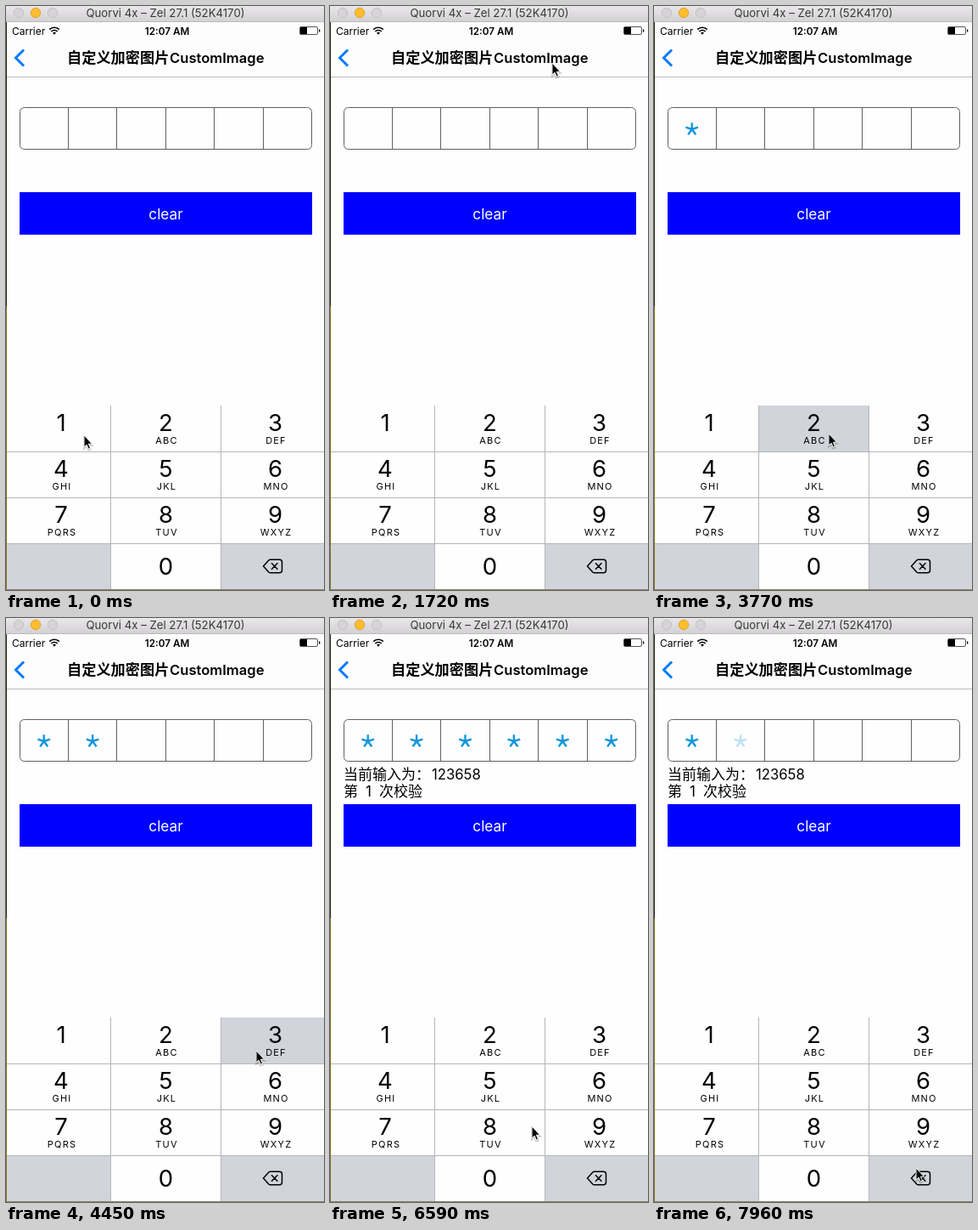
Animation, 375 px wide and 687 px high, one loop 8000 ms. Source, as an HTML page:

```html
<!DOCTYPE html>
<html lang="zh-CN">
<head>
<meta charset="utf-8">
<title>Passcode entry</title>
<style>
html, body { margin: 0; width: 100%; height: 100%; overflow: hidden; background: #fefefe; }
svg { display: block; width: 375px; height: 687px; font-family: Inter, "Noto Sans CJK SC", "Noto Sans CJK", sans-serif; }
.mid { text-anchor: middle; }
.bold { font-weight: 600; }
.digit { font-size: 27.5px; }
.sub { font-size: 11px; letter-spacing: 1.2px; }
.label { font-size: 17px; }
</style>
</head>
<body>
<svg viewBox="0 0 375 687">
  <defs>
    <linearGradient id="bar" x2="0" y2="1">
      <stop stop-color="#e9e7e9"/><stop offset="1" stop-color="#d2d0d2"/>
    </linearGradient>
    <path id="arrow" d="M0 0V14L3.200 11.200 5.200 16 7.500 15 5.400 10.200H9.600Z"/>
  </defs>
  <rect width="375" height="687" fill="#fefefe"/>

  <!-- window bar -->
  <rect width="375" height="19" fill="url(#bar)"/>
  <g fill="#d6d4d6" stroke="#c3c1c3">
    <circle cx="15" cy="8" r="5.7"/>
    <circle cx="35" cy="8" r="5.7" fill="#fdbd2f" stroke="#e2a32c"/>
    <circle cx="55" cy="8" r="5.7"/>
  </g>
  <text class="mid" x="188" y="13" font-size="13.2" fill="#383838">Quorvi 4x – Zel 27.1 (52K4170)</text>

  <!-- status and navigation -->
  <rect y="19" width="375" height="64" fill="#fdfdfd"/>
  <path d="M0 18.5H375M0 83.5H375" stroke="#bcbcbc"/>
  <text x="7" y="34" font-size="12">Carrier</text>
  <g fill="none" stroke="#000" stroke-width="1.7">
    <path d="M51.2 27.6a8.3 8.3 0 0 1 11.6 0M53.3 30a5.3 5.3 0 0 1 7.4 0"/>
    <path d="M55 31.6a2.9 2.9 0 0 1 4 0L57 33.8Z" fill="#000" stroke="none"/>
  </g>
  <text class="mid bold" x="190" y="34" font-size="11.7">12:07 AM</text>
  <rect x="346.5" y="24.5" width="21" height="9" rx="1.5" fill="none" stroke="#555"/>
  <path d="M347 25h8v8h-8zM369 27.5h1.3v3h-1.3z"/>
  <path d="M21 51.5 11.5 61 21 70.5" fill="none" stroke="#007aff" stroke-width="3"/>
  <text class="bold" x="72" y="67" font-size="17.2">自定义加密图片<tspan x="193" font-size="16.6">CustomImage</tspan></text>

  <!-- passcode field -->
  <g fill="none" stroke="#606060">
    <rect x="16.5" y="119.5" width="344" height="49" rx="5"/>
    <path d="M73.5 120v48M130.5 120v48M188.5 120v48M245.5 120v48M303.5 120v48"/>
  </g>
  <g id="stars" fill="none" stroke="#1296db" stroke-width="2.400"></g>
  <g id="result" class="label">
    <text x="16" y="190">当前输入为：<tspan x="120" font-size="16.7">123658</tspan></text>
    <text x="16" y="210">第<tspan x="42">1</tspan><tspan x="58">次校验</tspan></text>
  </g>
  <rect x="16" y="219" width="345" height="50" fill="#00f"/>
  <text class="mid" x="188.5" y="250.5" font-size="17.2" fill="#fff">clear</text>

  <!-- keypad -->
  <g id="keys"></g>
  <path d="M123.5 470V686M253.5 470V686M1 524.5H375M1 578.5H375M1 632.5H375" stroke="#b4b5b8"/>
  <g id="legends"></g>
  <path d="M303.5 659l6.3-7q.8-.8 2-.8H322.5q3 0 3 3v9.6q0 3-3 3H311.8q-1.2 0-2-.8ZM313 655.3l7.4 7.4M320.4 655.3l-7.4 7.4"
    fill="none" stroke="#000" stroke-width="1.5"/>

  <!-- window edges -->
  <path d="M0 19h1v334H0z" fill="#2a2818"/>
  <path d="M0 353h1v334H0z" fill="#8a7420"/>
  <path d="M0 686h375v1H0z" fill="#8b8467"/>

  <g id="cursor">
    <use href="#arrow" y="1.500" fill="none" stroke="#0003" stroke-width="2"/>
    <use href="#arrow" stroke="#fff" stroke-width="1"/>
  </g>
</svg>
<script>
const LOOP = 8000, FADE = 140, CODE = '123658';
const $ = id => document.getElementById(id);
const clamp = v => Math.max(0, Math.min(1, v));

function add(parent, tag, attrs, text = '') {
  const el = document.createElementNS('http://www.w3.org/2000/svg', tag);
  for (const k in attrs) el.setAttribute(k, attrs[k]);
  el.textContent = text;
  return parent.appendChild(el);
}

// '<' is the delete key, '_' the blank one
const edges = [1, 124, 254, 375], centers = [65, 188.5, 317.5];
const letters = ['', 'ABC', 'DEF', 'GHI', 'JKL', 'MNO', 'PQRS', 'TUV', 'WXYZ'];
const keys = [...'123456789_0<'].map((name, i) => {
  const col = i % 3, y = 470 + 54 * Math.floor(i / 3), x = centers[col];
  const grey = '_<'.includes(name);
  add($('legends'), 'text', { class: 'mid digit', x, y: y + (i > 8 ? 37 : 30) }, grey ? '' : name);
  add($('legends'), 'text', { class: 'mid sub', x: x + 1, y: y + 45 }, letters[i]);
  const el = add($('keys'), 'rect', { x: edges[col], y, width: edges[col + 1] - edges[col], height: 54 });
  return { name, grey, el };
});

// Typing speeds up after the third key; each press acts on release
const typed = [...CODE].map((name, i) => {
  const down = 3120 + 650 * Math.min(i, 2) + 430 * Math.max(i - 2, 0);
  return { name, down, up: down + 175 };
});
const erased = Array.from({ length: 5 }, (_, i) => {
  const down = 6750 + 255 * i;
  return { name: '<', down, up: down + 90 };
});
const presses = [...typed, ...erased];

let spokes = '';
for (let i = 0; i < 5; i++) {
  const a = i * Math.PI * 0.4;
  spokes += `M0 0L${7.7 * Math.sin(a)} ${-7.7 * Math.cos(a)}`;
}
const stars = typed.map(({ up }, i) => ({
  on: up, off: erased[5 - i]?.up ?? Infinity,
  el: add($('stars'), 'path', { d: spokes, transform: `translate(${44.7 + 57.4 * i} 145)` })
}));

// Pointer moves: start, end, destination; it rests in between
const touch = {
  1: [82, 497], 2: [206, 503], 3: [295, 509], 6: [300, 552],
  5: [214, 547], 8: [211, 602], '<': [309, 647]
};
const moves = [
  [0, 0, [92, 505]],
  [400, 1110, [136, 37]], [1110, 1210, [70, 63]], [1240, 1720, [262, 67]],
  [1720, 1830, [43, 339]], [1890, 2110, [4, 534]], [2110, 2350, touch[1]],
  ...typed.slice(1).map((p, i) => [typed[i].up, p.down - 30, touch[p.name]]),
  [6570, 6590, [238, 598]], [6590, 6730, touch['<']]
];

function pointer(t) {
  const n = moves.findLastIndex(m => m[0] <= t);
  const [start, end, to] = moves[n], from = n ? moves[n - 1][2] : to;
  const u = clamp((t - start) / (end - start || 1)), e = u * u * (3 - 2 * u);
  return to.map((v, i) => from[i] + (v - from[i]) * e);
}

function draw(t) {
  for (const { name, grey, el } of keys) {
    const pressed = presses.some(p => p.name === name && t >= p.down && t < p.up);
    el.setAttribute('fill', grey !== pressed ? '#d1d4da' : '#fefefe');
  }
  for (const s of stars) {
    s.el.setAttribute('opacity', clamp((t - s.on) / FADE) - clamp((t - s.off) / FADE));
  }
  $('result').setAttribute('visibility', t >= typed[5].up ? 'visible' : 'hidden');
  // The pointer leaves the window for a moment
  $('cursor').setAttribute('visibility', t >= 1890 && t < 2130 ? 'hidden' : 'visible');
  $('cursor').setAttribute('transform', `translate(${pointer(t)})`);
}

const start = performance.now();
function tick() {
  draw((performance.now() - start) % LOOP);
  requestAnimationFrame(tick);
}
tick();
</script>
</body>
</html>
```
